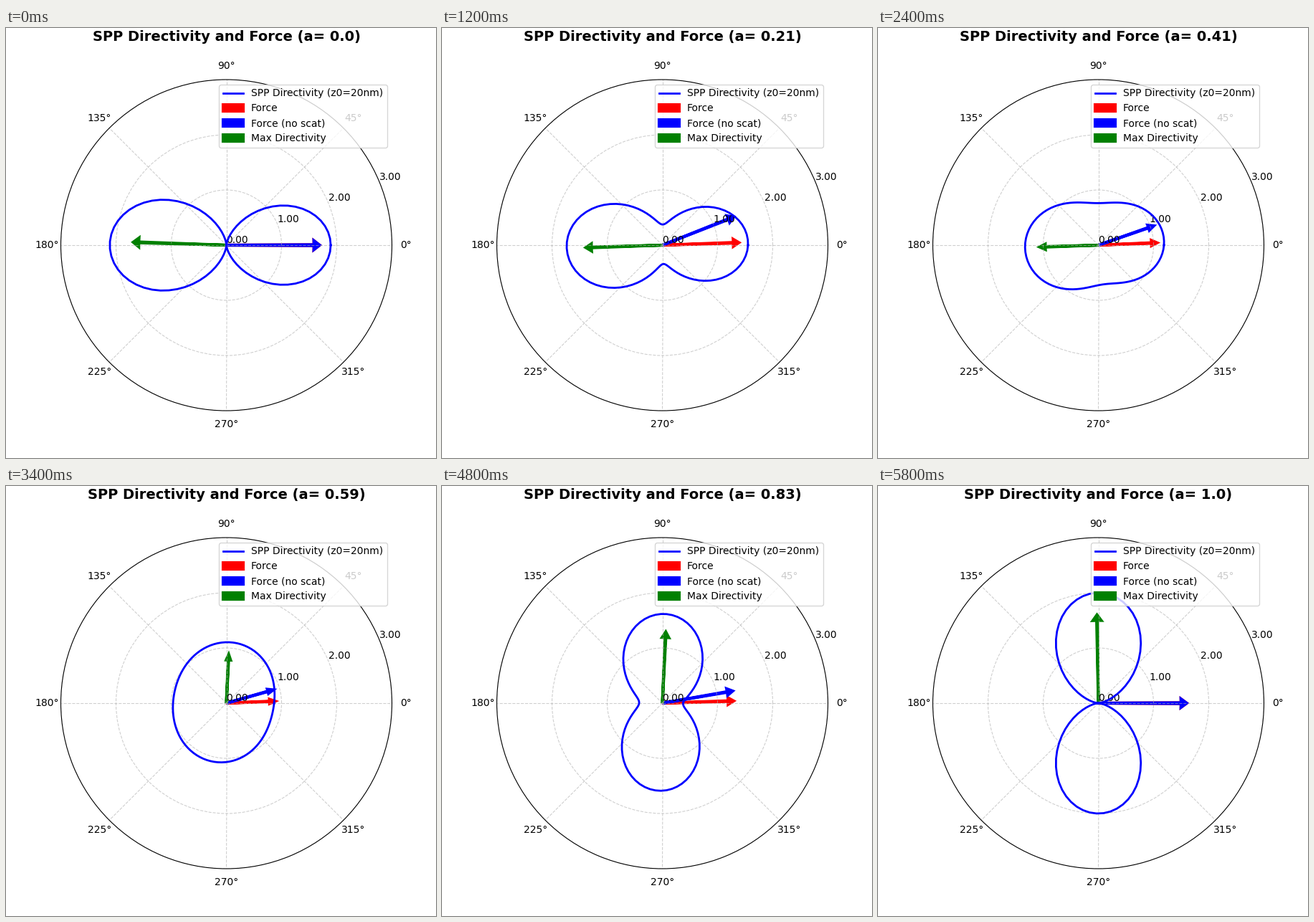
These frames come from a looping animation (600x600 px, 6000 ms). A matplotlib script:

```python
import numpy as np
import matplotlib.pyplot as plt
from matplotlib.animation import FuncAnimation

FRAMES = 30
THETA = np.linspace(0, 2 * np.pi, 100)
PHASE = np.exp(1j * np.arccos(0.038))   # phase between the two dipole components
OFFSET = 0.0393 - 0.0146j               # out-of-plane part induced by the x dipole
Y_WEIGHT = 0.837                        # relative strength of the y dipole


def directivity(a):
    share = Y_WEIGHT * a / (1 - a + Y_WEIGHT * a)
    px, py = np.sqrt(1 - share), np.sqrt(share) * PHASE
    field = np.sqrt(2) * (px * np.cos(THETA) + py * np.sin(THETA)) - OFFSET * px
    return np.abs(field) ** 2


def force_angles(a):
    mix = np.sqrt(a * (1 - a))
    return np.arctan(0.082 * mix), np.arctan(mix / (0.64 + 1.87 * a))


fig = plt.figure(figsize=(6, 6), dpi=100)
ax = fig.add_subplot(projection="polar")
title = fig.text(307.5 / 600, 582 / 600, "", ha="center", va="baseline",
                 fontsize=14, fontweight="bold")

line, = ax.plot(THETA, directivity(0), color="blue", lw=2,
                label="SPP Directivity (z0=20nm)")


def add_arrow(color, label):
    return ax.arrow(0, 0, 0, 1, width=0.01, head_width=0.1, head_length=0.1,
                    length_includes_head=True, lw=3, color=color, label=label)


arrows = [add_arrow("red", "Force"),
          add_arrow("blue", "Force (no scat)"),
          add_arrow("green", "Max Directivity")]

ax.set_ylim(0, 3)
ticks = [0, 1, 2, 3]
ax.set_yticks(ticks, [f"{t:.2f}" for t in ticks])
ax.grid(True, linestyle="--", alpha=0.6)
ax.legend(loc="upper right")


def update(i):
    a = i / (FRAMES - 1)
    d = directivity(a)
    line.set_ydata(d)
    peak = THETA[np.argmax(np.round(d, 9))]
    for arrow, angle in zip(arrows, (*force_angles(a), peak)):
        arrow.set_data(x=angle, y=0, dx=0, dy=0.8 * d.max())
    title.set_text(f"SPP Directivity and Force (a= {round(a, 2)})")
    return [line, title, *arrows]


anim = FuncAnimation(fig, update, frames=FRAMES, interval=200,
                     repeat=True, repeat_delay=0, blit=False)
plt.show()
```
